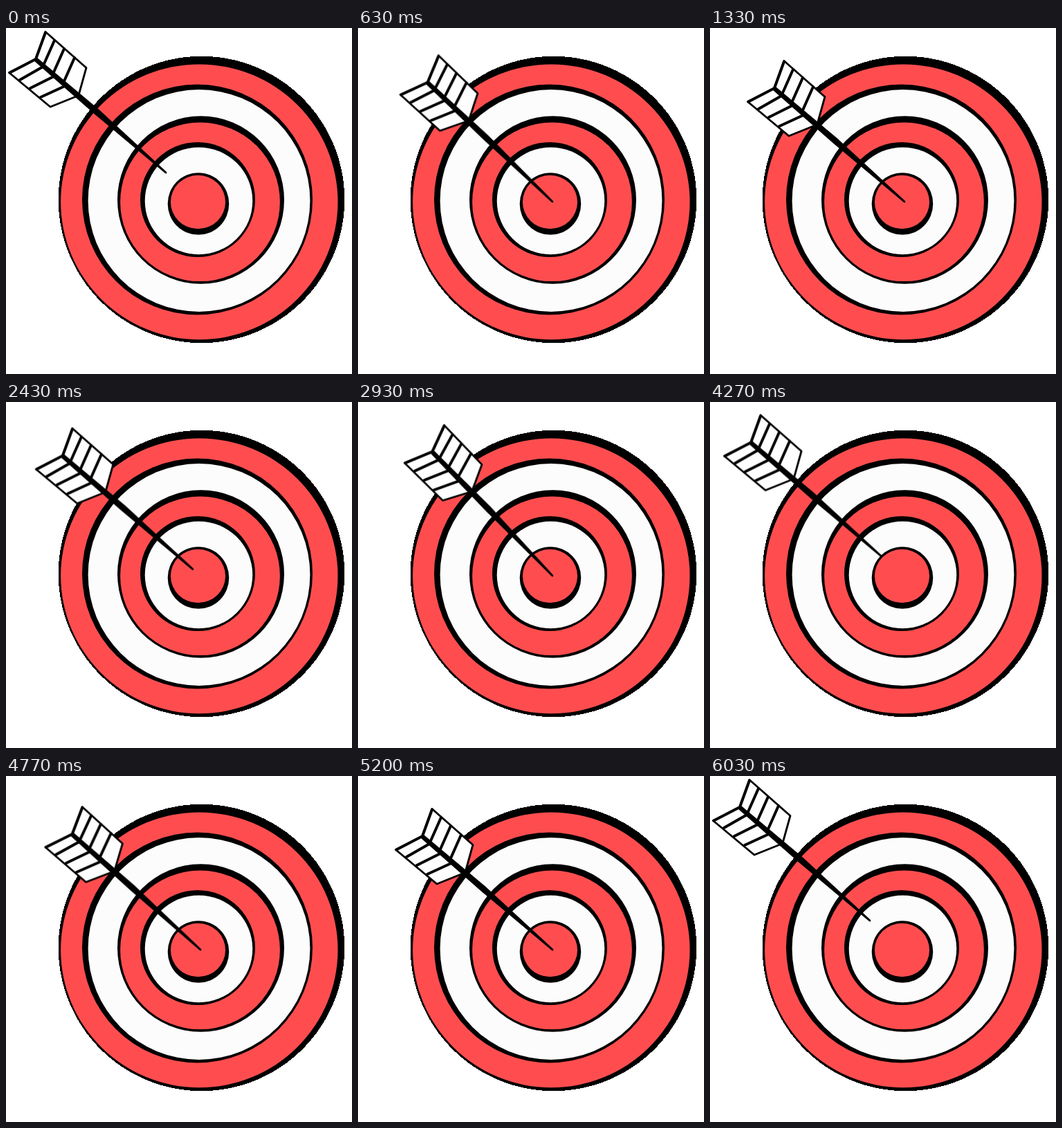
An HTML page that plays this animation: 500 by 500 pixels, repeating every 6.06 s.

```html
<!DOCTYPE html>
<html lang="en">
<head>
<meta charset="utf-8">
<title>Arrow and target</title>
<style>
  html, body { margin: 0; width: 100%; height: 100%; overflow: hidden; background: #fff; }
  svg { display: block; width: 100vw; height: 100vh; }
  ellipse:first-child { shape-rendering: crispEdges; }
  .vane { fill: #fefefe; stroke: #000; stroke-width: 2.8; stroke-linejoin: round; }
  .barb { fill: none; stroke: #000; stroke-width: 4; stroke-linecap: round; stroke-linejoin: round; }
</style>
</head>
<body>
<svg viewBox="0 0 500 500">
  <g id="rings"></g>
  <!-- The arrow tip sits at the local origin. -->
  <g id="arrow">
    <path class="vane" d="M-188-163 L-174-202.5 L-115-150.5 L-126-111Z"/>
    <path class="vane" d="M-226.5-143.5 L-188-163 L-126-110.5 L-167-94Z"/>
    <path class="barb" d="M-225.5-143.5 L-188-163 L-174-201.5"/>
    <path class="barb" d="M-161-190 L-177-154 M-147-178 L-163-142 M-132-165 L-148-129"/>
    <path class="barb" d="M-211-133 L-176-153 M-196-121 L-160-139 M-181-108 L-144-125"/>
    <path d="M-191-161 L-187-166 L-97-90.5 L0-1 Q2.5 1 .5 2.5 L-1 2 L-103-83.5Z"/>
  </g>
</svg>
<script>
const RED = '#ff4d4f', WHITE = '#fcfcfc', BLACK = '#000';

// cx, cy, rx, ry, fill; offset pairs give the uneven ink outline
const discs = [
  [282.5, 248, 206.8, 207.2, BLACK], [279.3, 251.3, 200.2, 198.9, RED],
  [276.5, 248, 166.5, 166.5, BLACK], [279, 249.5, 160.4, 160.4, WHITE],
  [281.5, 248.5, 120.5, 121.3, BLACK], [280.5, 251.3, 115.4, 114.8, RED],
  [277, 248, 83, 83, BLACK], [278.5, 249.8, 77.8, 77.4, WHITE],
  [278, 254, 44.3, 44.8, BLACK], [277.5, 251.5, 39.6, 38.8, RED],
];
document.getElementById('rings').innerHTML = discs.map(([cx, cy, rx, ry, fill]) =>
  `<ellipse cx="${cx}" cy="${cy}" rx="${rx}" ry="${ry}" fill="${fill}"/>`).join('');

const CYCLE = 2020;
const SINE = 'cubic-bezier(.37, 0, .63, 1)';

// time in ms, distance pulled back (0..1), wobble in degrees
const steps = [
  [0, 1, 0],
  [600, 0, 0],
  [680, 0, 8],
  [790, 0, -8],
  [900, 0, 5],
  [1010, 0, -3],
  [1130, 0, 0],
  [1330, 0, 0],
  [1940, 1, 0],
  [CYCLE, 1, 0],
];
document.getElementById('arrow').animate(
  steps.map(([time, back, angle]) => ({
    offset: time / CYCLE,
    easing: SINE,
    transform: `translate(${281 - 50 * back}px, ${250 - 42 * back}px) rotate(${angle}deg)`,
  })),
  { duration: CYCLE, iterations: Infinity });
</script>
</body>
</html>
```
